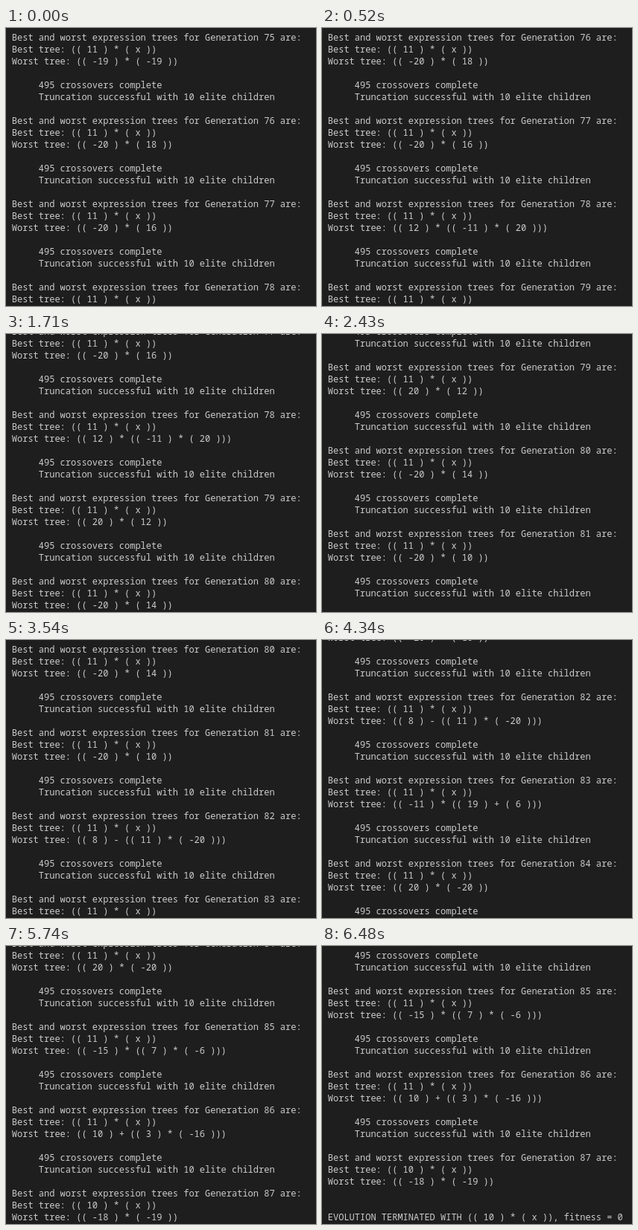
An HTML page with a canvas that plays this animation: 416 px wide and 374 px high, repeating every 6.51 s.

```html
<!DOCTYPE html>
<html lang="en">
<head>
<meta charset="utf-8">
<title>Evolution log</title>
<style>
  html, body { margin: 0; width: 100%; height: 100%; overflow: hidden; background: #1e1e1e; }
  canvas { display: block; }
</style>
</head>
<body>
<canvas id="stage" width="416" height="374"></canvas>
<script>
const ctx = document.getElementById('stage').getContext('2d');
const W = 416, H = 374;
const LOOP = 6510, LINE_GAP = 50;
const ROW = 16, LEFT = 7.8, BASE = 17, ROWS = 23;
const FIRST_GEN = 75;

const worst = [
  '(( -19 ) * ( -19 ))',
  '(( -20 ) * ( 18 ))',
  '(( -20 ) * ( 16 ))',
  '(( 12 ) * (( -11 ) * ( 20 )))',
  '(( 20 ) * ( 12 ))',
  '(( -20 ) * ( 14 ))',
  '(( -20 ) * ( 10 ))',
  '(( 8 ) - (( 11 ) * ( -20 )))',
  '(( -11 ) * (( 19 ) + ( 6 )))',
  '(( 20 ) * ( -20 ))',
  '(( -15 ) * (( 7 ) * ( -6 )))',
  '(( 10 ) + (( 3 ) * ( -16 )))',
  '(( -18 ) * ( -19 ))'
];

// Each burst prints a number of lines, one per LINE_GAP: [start ms, lines]
const bursts = [
  [160, 7], [840, 7], [1550, 1], [1800, 6], [2220, 7], [2880, 7],
  [3700, 7], [4220, 7], [4740, 7], [5230, 7], [5740, 4]
];

function buildLog() {
  const log = [];
  worst.forEach((tree, i) => {
    const last = i === worst.length - 1;
    log.push(
      `Best and worst expression trees for Generation ${FIRST_GEN + i} are:`,
      `Best tree: (( ${last ? 10 : 11} ) * ( x ))`,
      `Worst tree: ${tree}`,
      ''
    );
    if (last) log.push('', 'EVOLUTION TERMINATED WITH (( 10 ) * ( x )), fitness = 0');
    else log.push('     495 crossovers complete', '     Truncation successful with 10 elite children', '');
  });
  return log;
}

const log = buildLog();

function scrolledLines(t) {
  return bursts.reduce((sum, [start, count]) => {
    const printed = Math.floor((t - start) / LINE_GAP) + 1;
    return sum + Math.max(0, Math.min(count, printed));
  }, 0);
}

function draw(t) {
  const top = scrolledLines(t);
  ctx.fillStyle = '#1e1e1e';
  ctx.fillRect(0, 0, W, H);
  ctx.fillStyle = '#cccccc';
  ctx.font = '12px "Noto Sans Mono", "DejaVu Sans Mono", monospace';
  // Row -1 peeks in above the top edge
  for (let row = -1; row < ROWS; row++) {
    const text = log[top + row];
    if (text) ctx.fillText(text, LEFT, BASE + row * ROW);
  }
}

const begin = performance.now();
function tick() {
  draw((performance.now() - begin) % LOOP);
  requestAnimationFrame(tick);
}
tick();
</script>
</body>
</html>
```
